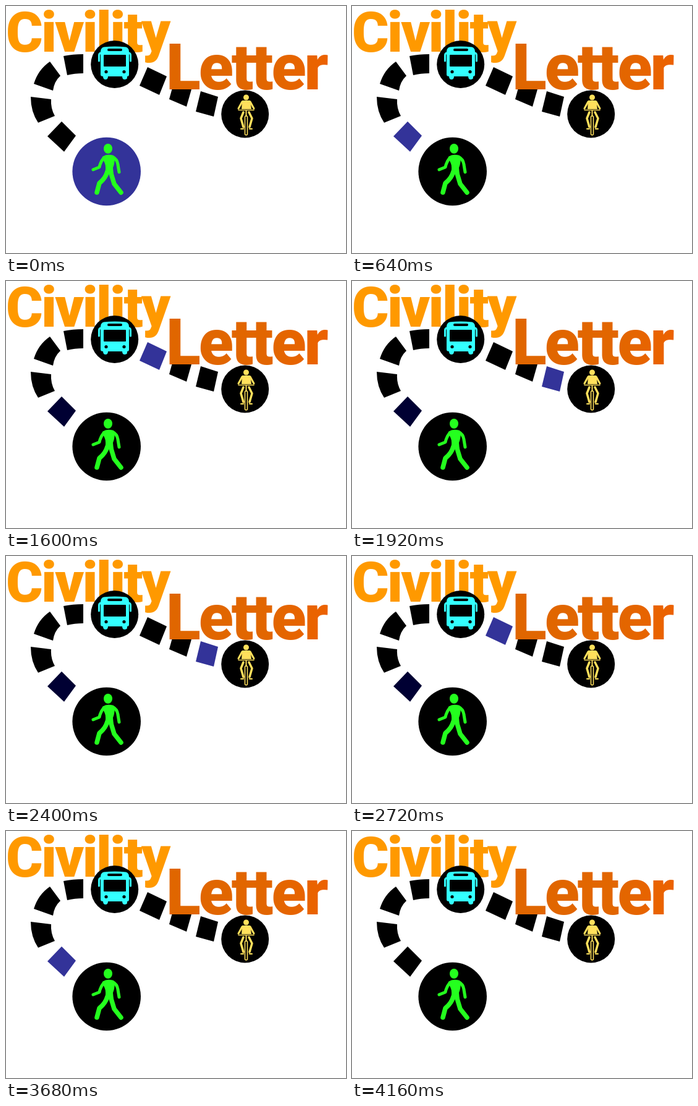
These frames come from a looping animation (550x400 px, 4320 ms). An HTML page:

```html
<!DOCTYPE html>
<html lang="en">
<head>
<meta charset="utf-8">
<title>Civility Letter</title>
<style>
  html, body { margin: 0; width: 100%; height: 100%; overflow: hidden; background: #fff; }
  svg { display: block; width: 550px; height: 400px; }
  text { font-family: Roboto, "Liberation Sans", sans-serif; font-weight: 900; letter-spacing: -0.03em; }
  .line { fill: none; stroke-linecap: round; stroke-linejoin: round; }
</style>
</head>
<body>
<svg viewBox="0 0 550 400">
  <defs>
    <linearGradient id="rust">
      <stop offset="0" stop-color="#e06600"/>
      <stop offset=".65" stop-color="#e26600"/>
      <stop offset="1" stop-color="#ec6200"/>
    </linearGradient>
  </defs>

  <text x="0" y="74" font-size="91" fill="#ff9900">Civility</text>

  <g id="road">
    <path d="M90 187L113 210L94 236L67 211Z"/>
    <path d="M40 147L73 151Q72 166 79 178L52 189Q40 171 40 147Z"/>
    <path d="M71 90L88 113Q78 122 76 137L45 126Q52 103 71 90Z"/>
    <path d="M93 81Q108 78 125 78V109Q111 109 99 112Z"/>
    <path d="M229 99L260 114L248 144L216 129Z"/>
    <path d="M272 122L300 135L292 163L264 151Z"/>
    <path d="M315 138L343 147L336 179L307 171Z"/>
  </g>

  <g id="signs">
    <circle cx="162.7" cy="268" r="55.3"/>
    <circle cx="175.7" cy="94.5" r="38.5"/>
    <circle cx="386.7" cy="175" r="38.5"/>
  </g>

  <g id="walker" fill="#24ff1e" stroke="#24ff1e">
    <ellipse cx="165" cy="231" rx="7" ry="8" stroke="none"/>
    <path d="M156 244Q165 238 175 243Q177 252 173 262L174 273L160 272Q163 258 158 251Z" stroke="none"/>
    <path class="line" d="M158 246Q153 252 151 261L141 265" stroke-width="5"/>
    <path class="line" d="M172 244Q180 248 181 257L183 269" stroke-width="5"/>
    <path class="line" d="M164 268Q161 279 151 287L147 302" stroke-width="7.500"/>
    <path class="line" d="M169 268L175 288L186 302" stroke-width="7.500"/>
  </g>

  <g id="bus" fill="#33ffff">
    <path d="M158 66.5Q176 64.5 194 66.5Q199 68 199 74V111Q199 114 196 114V117Q195 119 192 119Q188 119 188 114H165Q165 119 161 119Q157 119 157 114Q153 114 153 111V74Q153 68 158 66.5Z"/>
    <path class="line" d="M154 76Q150.500 76 150.500 80V89M198 76Q201.500 76 201.500 80V89" stroke="#33ffff" stroke-width="3"/>
    <g class="hole">
      <rect x="164" y="69" width="24" height="4" rx="2"/>
      <rect x="158" y="79" width="36" height="19" rx="1"/>
      <circle cx="162" cy="106.500" r="2.600"/>
      <circle cx="191" cy="106.500" r="2.600"/>
    </g>
  </g>

  <g id="rider" fill="#ffe05c" stroke="#ffe05c">
    <circle cx="388.5" cy="148" r="4.500" stroke="none"/>
    <path d="M382 153H395L397 167H381Z" stroke="none"/>
    <path class="line" d="M382 155L376 166M395 155L401 166" stroke-width="3"/>
    <path class="line" d="M376 168.500H401" stroke-width="1.500"/>
    <path class="line" d="M384 172L380 182L384 196M393 172L398 182L394 196" stroke-width="3.500"/>
    <path class="line" d="M380 199H384M394 199H398" stroke-width="2"/>
    <path class="line" d="M388.500 170V178" stroke-width="2"/>
    <rect class="line" x="386.500" y="178" width="4" height="31" rx="2" stroke-width="1.600"/>
  </g>

  <text x="259" y="135" font-size="103" fill="url(#rust)">Letter</text>
</svg>
<script>
  const BLACK = "#000", NAVY = "#000033", BLUE = "#333399";
  const LOOP = 4320;
  const blocks = [...document.querySelectorAll("#road path")];
  const [walk, bus, bike] = document.querySelectorAll("#signs circle");
  const holes = document.querySelector(".hole");

  // The light travels out to the bike and back again.
  const there = [walk, ...blocks.slice(0, 4), bus, ...blocks.slice(4), bike];
  const route = [...there, ...there.slice(0, -1).reverse()];
  const isSign = part => part && part.tagName === "circle";
  const steps = route.map((part, i) => ({
    part,
    length: i === 0 ? 640 : isSign(part) ? 320 : 160
  }));

  function litAt(time) {
    for (const { part, length } of steps) {
      if (time < length) return part;
      time -= length;
    }
    return null;
  }

  function draw(time) {
    const lit = litAt(time % LOOP);
    for (const part of there) part.setAttribute("fill", part === lit ? BLUE : BLACK);
    if (lit && !isSign(lit) && lit !== blocks[0]) blocks[0].setAttribute("fill", NAVY);
    holes.setAttribute("fill", lit === bus ? BLUE : BLACK);
  }

  const start = performance.now();
  function tick() {
    draw(performance.now() - start);
    requestAnimationFrame(tick);
  }
  draw(0);
  requestAnimationFrame(tick);
</script>
</body>
</html>
```
